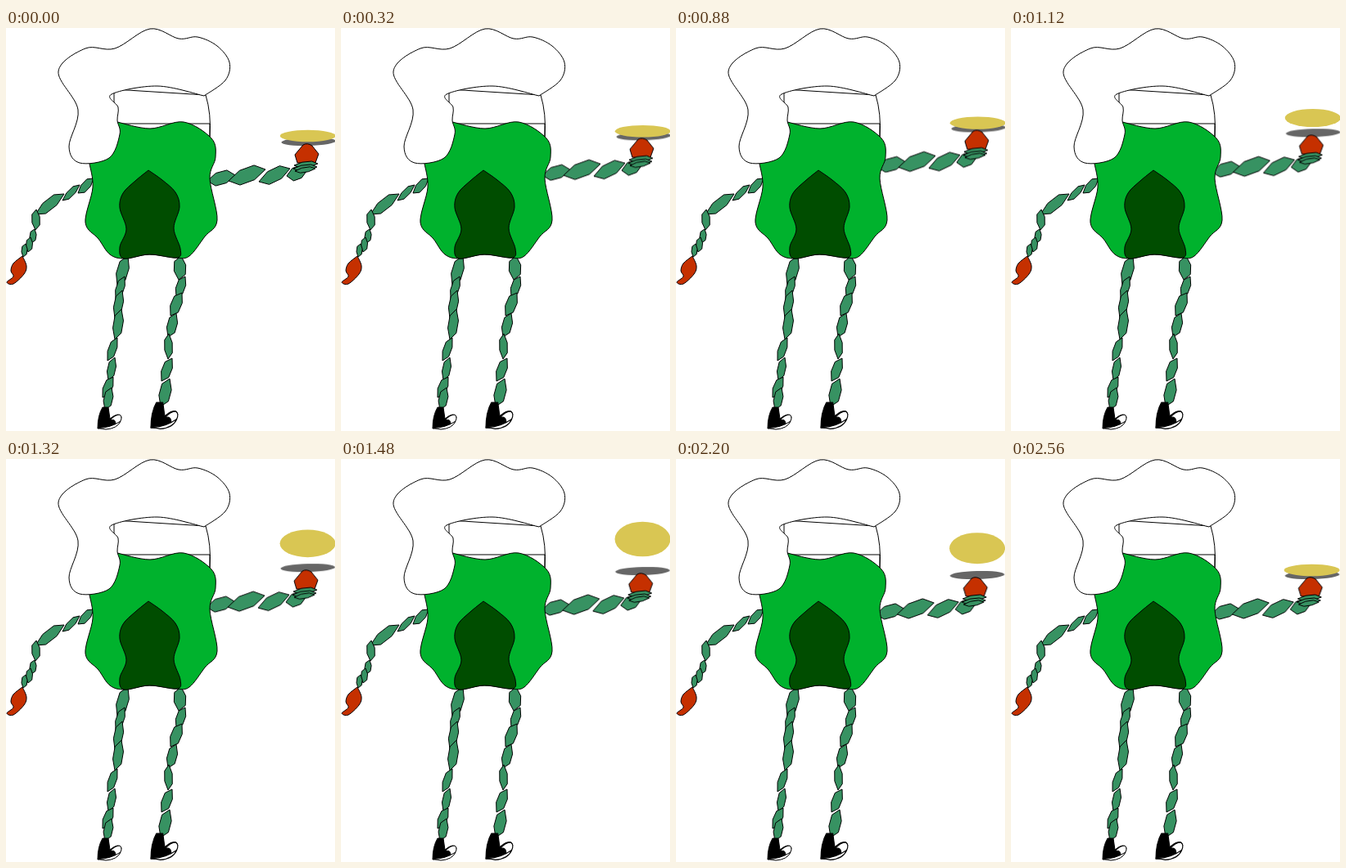
An HTML page that plays this animation: 402x493 px, repeating every 2600 ms.

```html
<!DOCTYPE html>
<html lang="en">
<head>
<meta charset="utf-8">
<title>Pancake chef</title>
<style>
  html, body { margin: 0; width: 100%; height: 100%; overflow: hidden; background: #fff; }
  svg { display: block; width: 100vw; height: 100vh; }

  .ink { stroke: #000; stroke-linejoin: round; }
  .limb { fill: #379262; }
  .hand { fill: #c53000; }
  .white { fill: #fff; }
  .body { fill: #00b22d; }
  .door { fill: #004d00; }

  /* 65 ticks of 40 ms; the tiny delay keeps ticks clear of rounding */
  #arm { animation: lift 2.6s -1ms infinite steps(21); }
  #pancake { animation: toss 2.6s -1ms infinite; }

  @keyframes lift {
    32.3077% { transform: translate(0, -17.6px); }
    64.6154%, 100% { transform: translate(-1.7px, 3px); }
  }

  @keyframes toss {
    0% { cx: 368.8px; cy: 132px; ry: 7.2px; animation-timing-function: steps(25); }
    38.4615% { cx: 368.8px; cy: 114px; ry: 7.7px; animation-timing-function: steps(17); }
    64.6154%, 75.3846% { cx: 368.4px; cy: 91.4px; ry: 27px; animation-timing-function: steps(15); }
    98.4615%, 100% { cx: 367.6px; cy: 136px; ry: 7.2px; }
  }
</style>
</head>
<body>
<svg viewBox="0 0 402 493" preserveAspectRatio="none">
  <defs>
    <g id="shoe" class="ink">
      <path d="M6 0 Q0 10 0 26 H13 Q26 23 29 12 Q26 5 15 14 L13 0z"/>
      <path class="white" d="M15 16 Q21 9 27 9 Q32 13 25 21 H22 Q22 13 15 16z"/>
      <path class="white" d="M0 25 Q14 26 28 17 Q24 26 10 27z"/>
    </g>
  </defs>

  <g id="limbs"></g>
  <use href="#shoe" x="112" y="464"/>
  <use href="#shoe" transform="translate(177 458) scale(1.13 1.2)"/>

  <g id="arm">
    <g id="sleeve"></g>
    <ellipse fill="#666" cx="369.7" cy="139" rx="33.3" ry="5" transform="rotate(-1.5 369.7 139)"/>
    <path class="ink hand" d="M353 155 L363 143 Q368 140 374 144 L382 154 L378 165 H356z"/>
    <g id="cuff"></g>
  </g>

  <path class="ink white" d="M132 75 V117 H249 V133 Q251 105 244 82z"/>
  <g id="figure"></g>
  <ellipse id="pancake" fill="#d9c653" cx="368.8" cy="132" rx="34" ry="7.2"/>
</svg>

<script>
  const NS = 'http://www.w3.org/2000/svg';

  function draw(parent, kind, d) {
    const path = document.createElementNS(NS, 'path');
    path.setAttribute('class', 'ink ' + kind);
    path.setAttribute('d', d);
    document.getElementById(parent).append(path);
  }

  // One twist of rope from tip to tip, with a bulge on either side.
  function twist(parent, x1, y1, x2, y2, w) {
    const dx = x2 - x1, dy = y2 - y1, k = w / Math.hypot(dx, dy);
    const at = (t, s) => `${x1 + t * dx - s * k * dy} ${y1 + t * dy + s * k * dx}`;
    draw(parent, 'limb', 'M' + [
      at(0, 0), at(.25, 1), at(.65, .9), at(1, 0), at(.75, -1), at(.35, -.9)
    ].join('L') + 'z');
  }

  function rope(parent, twists) {
    for (const t of twists) twist(parent, ...t);
  }

  // Smooth outline through points; it may turn sharply where it starts and ends.
  function outline(parent, kind, nums) {
    const n = nums.length / 2;
    const pt = i => {
      const j = 2 * Math.min(n - 1, Math.max(0, i));
      return [nums[j], nums[j + 1]];
    };
    let d = 'M' + pt(0);
    for (let i = 0; i < n - 1; i++) {
      const [a, b, c, e] = [pt(i - 1), pt(i), pt(i + 1), pt(i + 2)];
      const out = b.map((v, q) => v + (c[q] - a[q]) / 6);
      const into = c.map((v, q) => v - (e[q] - b[q]) / 6);
      d += `C${out} ${into} ${c}`;
    }
    draw(parent, kind, d + 'z');
  }

  const leftArm = [
    [107, 184, 88, 202, 5], [90, 192, 69, 211, 4], [71, 203, 36, 228, 6.5],
    [37, 222, 36, 247, 5], [35, 246, 31, 263, 4], [30, 256, 27, 274, 4],
    [24, 264, 21, 280, 3.5]
  ];
  const leftLeg = [
    [149, 279, 136, 315, 7], [145, 304, 134, 332, 5], [142, 321, 133, 355, 5.5],
    [141, 344, 133, 381, 6], [136, 379, 124, 407, 5], [133, 403, 125, 431, 5],
    [131, 427, 118, 452, 5.5], [129, 440, 121, 467, 5.5]
  ];
  const rightLeg = [
    [214, 279, 211, 308, 7.5], [219, 304, 208, 329, 5.5], [215, 324, 201, 352, 6.5],
    [208, 349, 198, 378, 6], [199, 374, 198, 405, 5], [203, 404, 190, 432, 6],
    [200, 429, 189, 463, 7]
  ];
  [leftArm, leftLeg, rightLeg].forEach(r => rope('limbs', r));

  rope('sleeve', [
    [246, 187, 280, 180, 8], [272, 187, 317, 173, 9],
    [309, 188, 347, 172, 8], [343, 181, 368, 174, 8]
  ]);
  rope('cuff', [
    [352, 168, 381, 166, 3.5], [351, 172, 380, 170, 3.5], [353, 175, 378, 172, 3]
  ]);

  outline('limbs', 'hand', [
    20, 279, 9, 288, 6, 297, 9, 304, 1, 311, 9, 313, 22, 301, 25, 291, 20, 279
  ]);
  outline('figure', 'body', [
    136, 115, 176, 123, 217, 115, 251, 135, 256, 158, 249, 184, 258, 235, 243, 255,
    224, 279, 207, 281, 175, 277, 145, 282, 127, 277, 113, 258, 97, 238, 106, 195, 102, 166
  ]);
  outline('figure', 'door', [
    174, 174, 191, 186, 207, 201, 212, 219, 205, 245, 213, 270, 209, 281, 175, 277,
    144, 282, 139, 268, 147, 246, 139, 220, 143, 202, 158, 187, 174, 174
  ]);
  outline('figure', 'white', [
    242, 83, 268, 64, 273, 42, 258, 22, 234, 11, 211, 13, 176, 1, 133, 25, 97, 25, 64, 53,
    88, 100, 77, 145, 90, 165, 126, 159, 139, 130, 136, 113, 137, 97, 129, 81, 185, 71, 242, 83
  ]);
</script>
</body>
</html>
```
